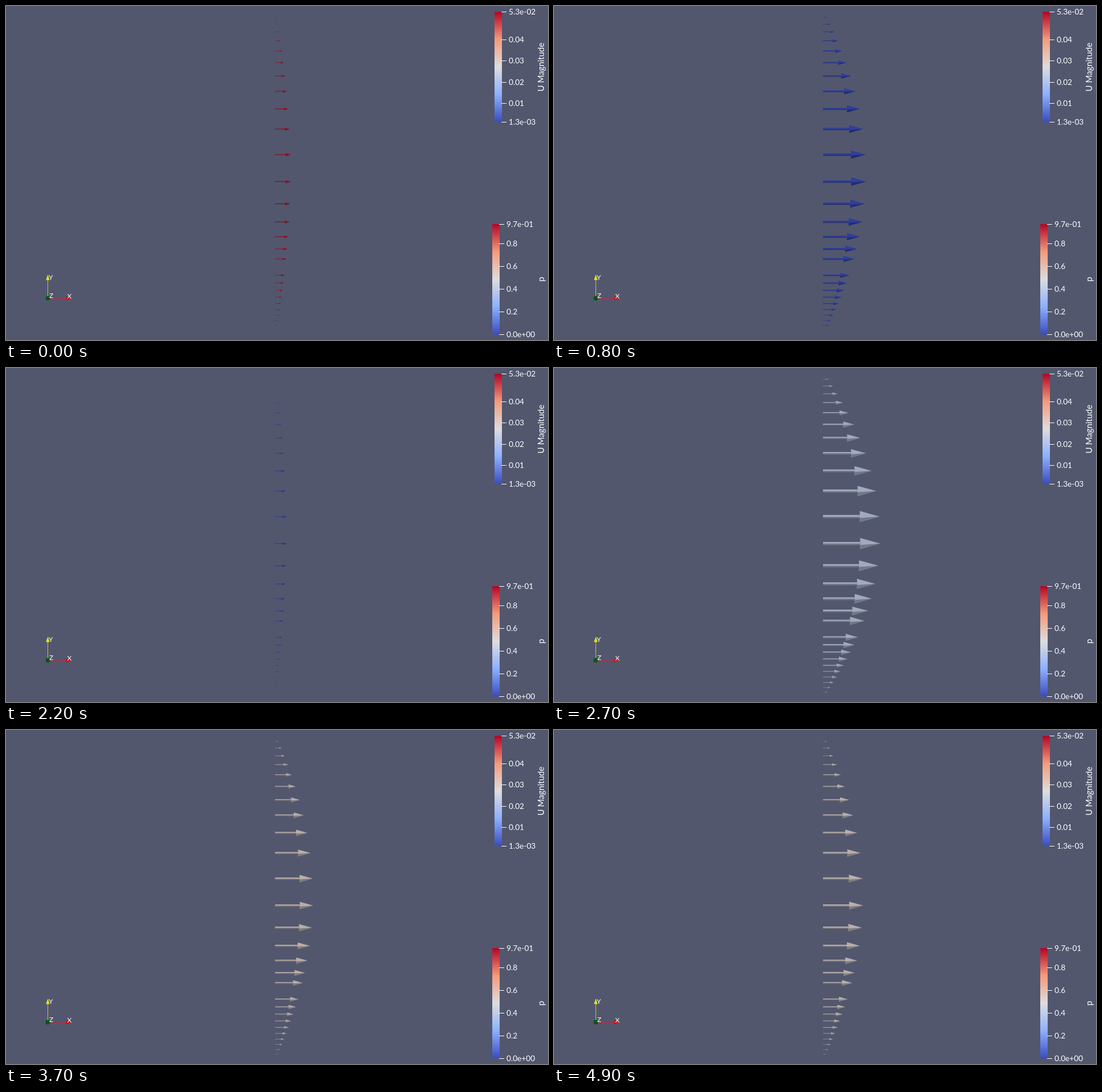
Recreate the animation shown at these times as an HTML page with a canvas. Size 953 px wide and 588 px high, loop 5 s.

```html
<!DOCTYPE html>
<html>
<head>
<meta charset="utf-8">
<style>
html, body { margin: 0; width: 100%; height: 100%; overflow: hidden; background: #52576e; }
canvas { display: block; }
</style>
</head>
<body>
<canvas id="stage" width="953" height="588"></canvas>
<script>
const ctx = document.getElementById('stage').getContext('2d');
const FONT = 'Lato, "Open Sans", sans-serif';

// Diverging colour map: blue, pale blue, grey, salmon, red
const MAP = [[59, 76, 192], [141, 176, 254], [221, 221, 221], [244, 154, 123], [180, 4, 38]];

// Positions whose gaps shrink by a constant ratio
function graded(y, gap, ratio, count) {
  return Array.from({ length: count }, (_, i) => y + gap * (1 - ratio ** i) / (1 - ratio));
}

// The mesh gets finer towards both walls
const ROWS = [
  ...graded(216.5, -35.5, 0.872, 10),
  ...graded(261.5, 47.5, 0.82, 7),
  ...graded(474, 13.6, 0.94, 10)
];

const rgb = (c, k = 1) => `rgb(${c.map(v => Math.round(v * k)).join()})`;

function mapColor(v) {
  const x = Math.min(1, Math.max(0, v)) * (MAP.length - 1);
  const i = Math.min(MAP.length - 2, Math.floor(x));
  return MAP[i].map((a, j) => a + (MAP[i + 1][j] - a) * (x - i));
}

function poly(color, ...pts) {
  ctx.fillStyle = color;
  ctx.beginPath();
  pts.forEach(([x, y]) => ctx.lineTo(x, y));
  ctx.fill();
}

function rect(color, x, y, w, h) {
  ctx.fillStyle = color;
  ctx.fillRect(x, y, w, h);
}

function text(str, x, y, size, align = 'left') {
  ctx.font = `${size}px ${FONT}`;
  ctx.textAlign = align;
  ctx.fillStyle = '#fff';
  ctx.fillText(str, x, y);
}

function legend(x, zeroY, scale, labels, title, titleY) {
  const yOf = label => zeroY - scale * label;
  const top = yOf(labels[0]), bottom = yOf(labels[labels.length - 1]);
  const g = ctx.createLinearGradient(0, bottom, 0, top);
  MAP.forEach((c, i) => g.addColorStop(i / (MAP.length - 1), rgb(c)));
  rect(g, x, top, 13, bottom - top);
  for (const label of labels) {
    const y = yOf(label);
    rect('#fff', x + 12, Math.round(y - 0.5), 9, 1);
    text(label, x + 25, y + 4.5, 13.7);
  }
  ctx.save();
  ctx.translate(945.5, titleY);
  ctx.rotate(-Math.PI / 2);
  text(title, 0, 0, 15, 'center');
  ctx.restore();
}

function axes() {
  rect('#c8c81e', 73, 482, 1, 32);
  poly('#e6e600', [73.5, 473], [76.8, 482.5], [70.2, 482.5]);
  rect('#c8283c', 74, 514, 33, 1);
  poly('#e00000', [106, 511.2], [115, 514.5], [106, 517.8]);
  ctx.fillStyle = '#005a0a';
  ctx.beginPath();
  ctx.arc(73.5, 514.5, 4, 0, 7);
  ctx.fill();
  text('Y', 78.7, 482, 12, 'center');
  text('Z', 79.5, 514, 12, 'center');
  text('X', 111.5, 515, 12, 'center');
}

function arrow(y, len, color) {
  const x = 473, neck = x + len * 0.65, tip = x + len;
  const shaft = len * 0.028, head = len * 0.097;
  const light = rgb(color, 0.82), dark = rgb(color, 0.58);
  rect(light, x, y - shaft, neck - x, shaft * 1.2);
  rect(dark, x, y + shaft * 0.2, neck - x, shaft * 0.8);
  poly(light, [neck, y - head], [tip, y], [neck, y + head]);
  poly(dark, [neck, y + head * 0.25], [tip, y], [neck, y + head]);
}

function draw(step) {
  rect('#52576e', 0, 0, 953, 588);
  // Rectified sine flow; pressure acts while it speeds up and spikes at each restart
  const phase = (14.9 + 15.2 * step) % 180;
  const a = phase * Math.PI / 180;
  const speed = 111 * Math.sin(a);
  const pressure = 0.57 * Math.max(0, Math.cos(a)) ** 0.35 + 0.8 * Math.exp(-((phase / 18) ** 2));
  const color = mapColor(pressure);
  for (const y of ROWS) arrow(y, speed * (1 - ((y - 294) / 288) ** 2), color);

  legend(859, 209, 3750, ['5.3e-02', '0.04', '0.03', '0.02', '0.01', '1.3e-03'], 'U Magnitude', 107.5);
  legend(855, 578, 200, ['9.7e-01', '0.8', '0.6', '0.4', '0.2', '0.0e+00'], 'p', 481);
  axes();
}

const start = performance.now();
function tick() {
  draw(Math.floor((performance.now() - start) / 100) % 50);
  requestAnimationFrame(tick);
}
tick();
</script>
</body>
</html>
```
